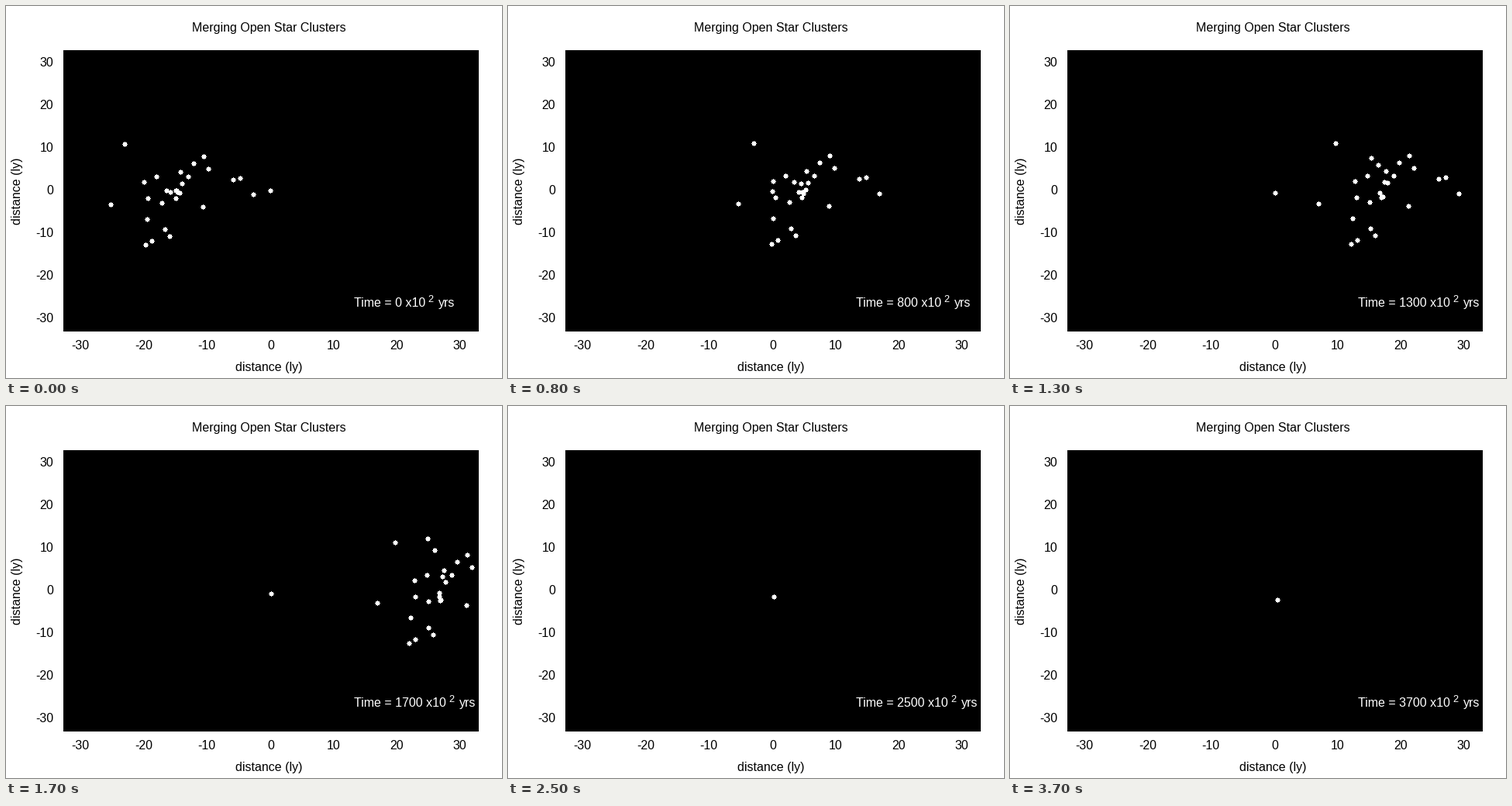
Write a matplotlib script that moves like this. It is 640x480 px and loops after 3.8 s.

```python
import numpy as np
import matplotlib.pyplot as plt
from matplotlib.animation import FuncAnimation
from matplotlib.collections import PolyCollection
from matplotlib.patches import Rectangle

WIDTH, HEIGHT = 640, 480
FRAMES, INTERVAL = 38, 100
SPEED, LIFT = 20, -0.09  # pixels per frame
ENCOUNTER = 6.2          # the core meets the lone star

plt.rcParams.update({"font.family": "Liberation Sans", "font.size": 16})

# Where the stars of the moving cluster start.
OUTER = np.array([
    (135, 256), (153, 178), (178, 227), (180, 308), (182, 275), (183, 248),
    (188, 303), (194, 220), (201, 254), (205, 288), (211, 297), (219, 248),
    (225, 214), (227, 229), (235, 220), (242, 203), (254, 259), (255, 194),
    (261, 210), (293, 224), (302, 222), (319, 243),
])
CORE = np.array([
    (207, 238), (219, 238), (224, 241), (212, 240), (221, 240), (220, 238),
])


def speeds(points):
    """Stars trailing on the upper left fall a little faster."""
    x, y = points.T
    return SPEED + np.where(x < 215, np.clip((275 - y) / 90, 0, 0.55), 0)


def outer_stars(t):
    return OUTER + t * np.column_stack(
        [speeds(OUTER), np.full(len(OUTER), LIFT)])


def core_stars(t):
    """Straight until the encounter, then fanned out at the same speed."""
    speed = speeds(CORE)
    rank = np.arange(len(CORE))
    kick = 1.2 - 7.4 * np.exp(-rank**2 / 4.75)
    before, after = min(t, ENCOUNTER), max(0, t - ENCOUNTER)
    x = CORE[:, 0] + speed * before + np.sqrt(speed**2 - kick**2) * after
    y = CORE[:, 1] + kick * after
    return np.column_stack([x, y])


def lone_star(t):
    since = max(0, t - 6)
    return [(341 + since / 8, 238 + since * 0.4)]


def star_centers(t):
    centers = np.vstack([outer_stars(t), core_stars(t), lone_star(t)])
    return np.floor(centers + 0.5) + 0.5


def star_outline():
    """A 5 px square with a one-pixel tip on each side."""
    side = np.array(
        [(-2.5, -2.5), (-0.5, -2.5), (-0.5, -3.5), (0.5, -3.5), (0.5, -2.5)])
    quarter_turn = np.array([(0, 1), (-1, 0)])
    return np.vstack([side @ np.linalg.matrix_power(quarter_turn, n)
                      for n in range(4)])


STAR = star_outline()

fig = plt.figure(figsize=(WIDTH / 72, HEIGHT / 72), dpi=72, facecolor="white")
ax = fig.add_axes([0, 0, 1, 1])
ax.set_xlim(0, WIDTH)
ax.set_ylim(HEIGHT, 0)
ax.axis("off")


def label(x, y, text, ha="center", **style):
    return ax.text(x, y, text, ha=ha, va="baseline", **style)


sky = ax.add_patch(Rectangle((74, 57), 536, 363, facecolor="black", linewidth=0))

label(339.5, 33, "Merging Open Star Clusters")
label(339, 471, "distance (ly)")
label(19, 239, "distance (ly)", rotation=90, rotation_mode="anchor")

for step in range(-3, 4):
    center = 342 if step >= 0 else 339.6
    label(center + 81.1 * step, 443, str(10 * step))
    label(61.3, 243 - 55 * step, str(10 * step), ha="right")

clock = label(449, 388, "", ha="left", color="white")
power = label(0, 382, "2", ha="left", color="white", fontsize=12.8)
unit = label(0, 388, "yrs", ha="left", color="white")

stars = PolyCollection([], facecolors="white", edgecolors="none", linewidths=0)
ax.add_collection(stars, autolim=False)
stars.set_clip_path(sky)


def update(frame):
    stars.set_verts([STAR + center for center in star_centers(frame)])
    count = str(100 * frame)
    shift = 8.9 * (len(count) - 1)
    clock.set_text(f"Time = {count} x10")
    power.set_x(544.6 + shift)
    unit.set_x(558 + shift)
    return stars, clock, power, unit


anim = FuncAnimation(fig, update, frames=FRAMES, interval=INTERVAL,
                     repeat=True, repeat_delay=0, blit=False)
plt.show()
```
